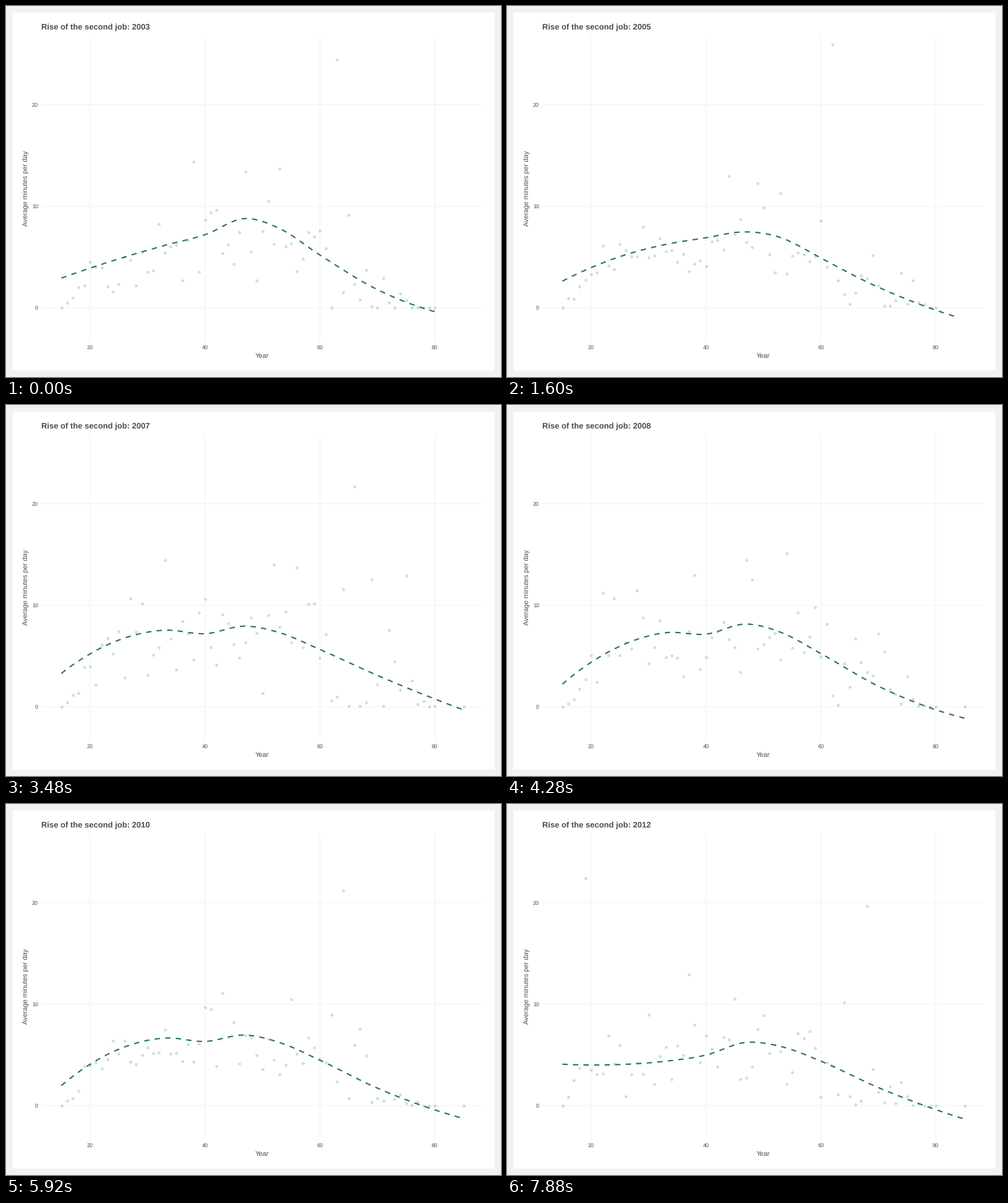
Recreate the animation shown at these times as a matplotlib script. Size 800x600 px, loop 8 s.

```python
import numpy as np
import matplotlib.pyplot as plt
from matplotlib.animation import FuncAnimation
from matplotlib.colors import to_rgba
from matplotlib.patches import Rectangle

PX = 0.72                      # points per pixel at 100 dpi
GREEN, TEXT, GREY = "#27725b", "#4d4d4d", "#f2f2f2"
HOLD, MOVE = 11, 11            # frames at rest, frames in motion
FIRST_YEAR, YEARS = 2003, 10
LAST_AGE_FROM = 2              # index of the first year that reaches age 85

plt.rcParams["font.family"] = "Liberation Sans"
plt.rcParams["text.hinting"] = "none"
plt.rcParams["path.snap"] = False

# Key points of the trend; a year that is not listed follows the next one,
# or the one before it at a plateau.
KNOTS = [15, 24, 33, 40, 47, 53, 60, 70]
RISE = [2.63, 4.85, 6.25, 6.9, 7.5, 6.95, 4.9, 2.0, -0.9]
CREST = [2.0, 5.55, 7.25, 7.15, 8.2, 7.35, 5.15, 1.8, -1.3]
SLUMP = [2.0, 5.15, 6.2, 5.67, 5.95, 5.3, 3.95, 1.7, -1.2]
TRENDS = [
    [2.93, 4.65, 6.15, 7.2, 8.8, 7.8, 5.2, 1.8, -0.37],
    RISE, RISE,
    [2.55, 5.25, 6.8, 7.15, 9.0, 8.35, 5.85, 1.85, -1.6],
    [3.3, 6.35, 7.55, 7.2, 7.95, 7.3, 5.65, 3.1, -0.3],
    CREST, CREST, SLUMP, SLUMP,
    [4.1, 4.05, 4.4, 5.0, 6.25, 5.85, 4.4, 1.8, -1.3],
]
OUTLIERS = {(2007, 66): 21.7, (2007, 75): 12.9, (2012, 19): 22.4}

ages = np.arange(15, 81)
rng = np.random.default_rng(7)


def px(age):
    return 57 + (age - 11.5) * 715 / 77


def py(minutes):
    return 488.2 - 16.43 * minutes


def last_age(k):
    return 85 if k >= LAST_AGE_FROM else 80


def trend(k, x):
    """Cubic Hermite curve through the key points of year k."""
    kx = np.array(KNOTS + [last_age(k)], float)
    ky = np.array(TRENDS[k])
    slope = np.gradient(ky, kx, edge_order=2)
    j = np.clip(np.searchsorted(kx, x) - 1, 0, len(kx) - 2)
    step = kx[j + 1] - kx[j]
    u = (x - kx[j]) / step
    return (ky[j] * (1 + 2 * u) * (1 - u) ** 2
            + ky[j + 1] * u ** 2 * (3 - 2 * u)
            + step * u * (1 - u) * (slope[j] * (1 - u) - slope[j + 1] * u))


def curve(k):
    x = np.linspace(15, last_age(k), 80)
    return np.array([px(x), py(trend(k, x))])


def scatter_values(k):
    """Skewed noise around the trend: teens start at zero, old age mostly is."""
    shape = np.where(ages < 62, 5, 0.6)
    ramp = np.clip((ages - 15) / 5, 0, 1)
    y = np.maximum(trend(k, ages), 0) * ramp * rng.gamma(shape) / shape
    for (year, age), minutes in OUTLIERS.items():
        if year == FIRST_YEAR + k:
            y[age - 15] = minutes
    return y


curves = [curve(k) for k in range(YEARS)]
values = [scatter_values(k) for k in range(YEARS)]

fig = plt.figure(figsize=(8, 6), dpi=100, facecolor=GREY)
ax = fig.add_axes([0, 0, 1, 1])
ax.set(xlim=(0, 800), ylim=(600, 0))
ax.axis("off")
ax.add_patch(Rectangle((10.67, 10.67), 778.66, 578.66, fc="white", lw=0, zorder=0))


def label(x, y, s, size, ha="center", **kw):
    return ax.text(x, y, s, fontsize=size * PX, color=TEXT, ha=ha,
                   va="baseline", **kw)


grid = dict(color=GREY, lw=1.07 * PX, zorder=1, solid_capstyle="butt")
for m in (0, 10, 20):
    ax.plot([57, 772], [py(m)] * 2, **grid)
    label(52, py(m) + 3.2, str(m), 9, ha="right")
for a in (20, 40, 60, 80):
    ax.plot([px(a)] * 2, [48, 543.5], **grid)
    label(px(a), 555, str(a), 9)
label(414, 569, "Year", 11)
label(36, 295, "Average minutes per day", 11, rotation=90, rotation_mode="anchor")
title = label(57, 38, "", 13, ha="left", weight="bold")

soft = to_rgba(GREEN, 0.2)
dots = ax.scatter([], [], s=(3.9 * PX) ** 2, fc=[soft], ec=[soft],
                  lw=0.71 * PX, zorder=2)
line, = ax.plot([], [], color=GREEN, lw=2.134 * PX, ls=(0, (4, 4)),
                dash_capstyle="butt", zorder=3)


def draw(i):
    k, r = divmod(i, HOLD + MOVE)
    t = max(0, r - HOLD + 1) / MOVE
    nxt = min(k + 1, YEARS - 1)
    x, y = ages, (1 - t) * values[k] + t * values[nxt]
    if last_age(nxt if t == 1 else k) == 85:
        x, y = np.append(x, 85), np.append(y, 0)
    dots.set_offsets(np.column_stack([px(x), py(y)]))
    line.set_data(*((1 - t) * curves[k] + t * curves[nxt]))
    title.set_text(f"Rise of the second job: {FIRST_YEAR + k + (t >= 0.5)}")
    return dots, line, title


anim = FuncAnimation(fig, draw, frames=200, interval=40, repeat=True,
                     repeat_delay=0, blit=False)
plt.show()
```
